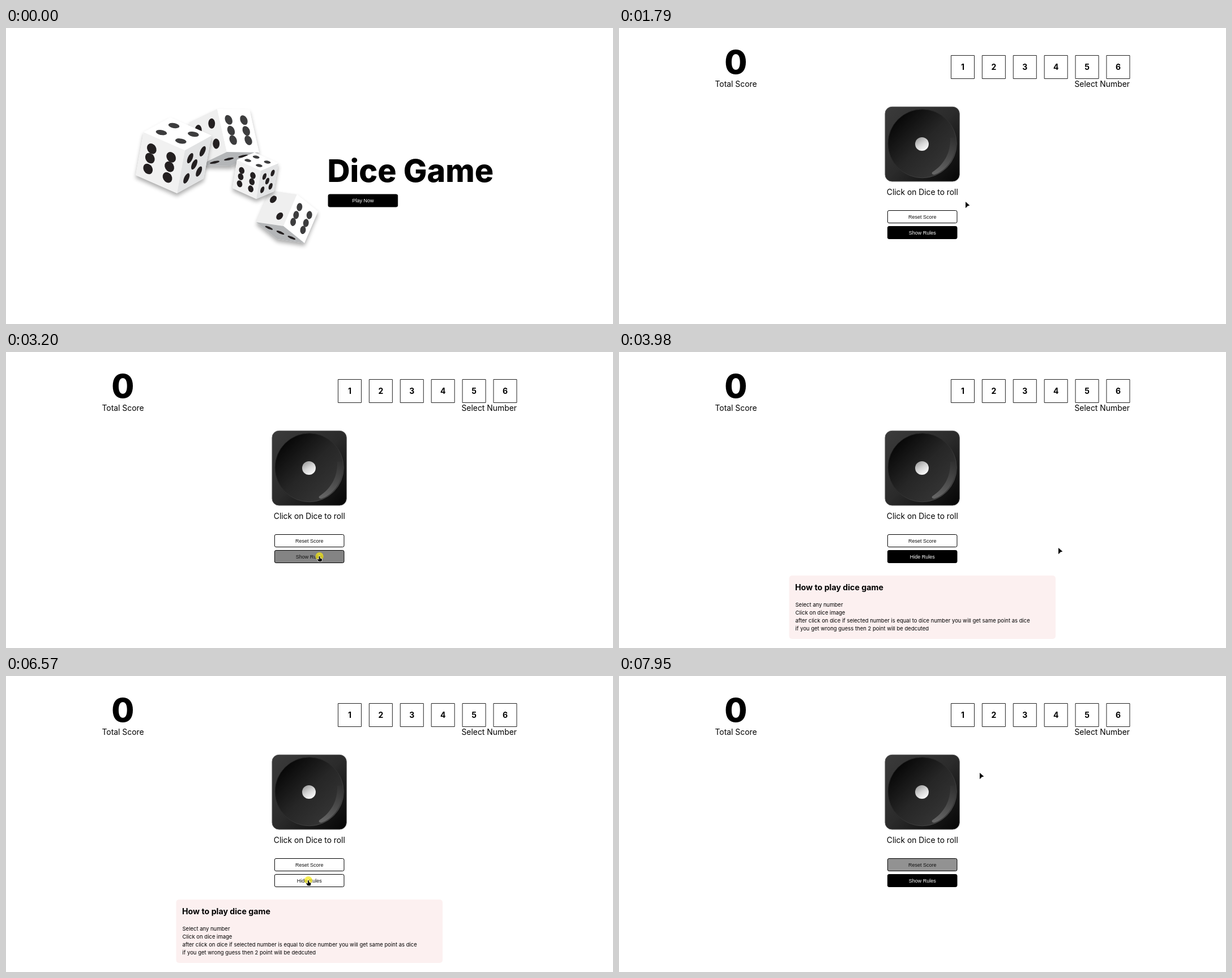
Write an HTML page with a canvas that moves like this. It is 1072 by 523 pixels and loops after 8 s.

```html
<!DOCTYPE html>
<html lang="en">
<head>
<meta charset="utf-8">
<title>Dice Game</title>
<style>
  html, body { margin: 0; width: 100%; height: 100%; overflow: hidden; background: #fff; }
  canvas { display: block; width: 1072px; height: 523px; }
</style>
</head>
<body>
<canvas id="stage"></canvas>
<script>
const W = 1072, H = 523, LOOP = 8000;
const canvas = document.getElementById('stage');
const ctx = canvas.getContext('2d');
const ratio = window.devicePixelRatio || 1;
canvas.width = W * ratio;
canvas.height = H * ratio;

const SANS = 'Inter, "Open Sans", sans-serif';
const ARIAL = '"Liberation Sans", Arial, sans-serif';
const INK = '#231f20', SOFT = '#3d3d3e', WHITE = '#fff';

const ENTRY = { x: 1033, y: 511 };
// The picture refreshes `updates` times per move while the pointer travels to x, y.
const MOVES = [
  { start: 190, end: 990, updates: 12, x: 612, y: 307 },
  { start: 1790, end: 2510, updates: 11, x: 673, y: 135, sway: 60 },
  { start: 2510, end: 2580, updates: 2, x: 668, y: 167 },
  { start: 2640, end: 3420, updates: 12, x: 553, y: 362 },
  { start: 3480, end: 3980, updates: 8, x: 776, y: 346 },
  { start: 4410, end: 5140, updates: 11, x: 597, y: 357 },
  { start: 5220, end: 5560, updates: 6, x: 534, y: 361 },
  { start: 6570, end: 6630, updates: 2, x: 534, y: 361 },
  { start: 6850, end: 7640, updates: 12, x: 586, y: 329 },
  { start: 7730, end: 7950, updates: 4, x: 637, y: 171 }
];

// Moments the pointer enters and leaves each button, alternating.
const HOVER = { play: [852], reset: [7060, 7812], rules: [3078, 3520, 5220, 6930] };
const GAME_AT = 990, RULES_OPEN = 3270, RULES_CLOSE = 6630;
const CLICK_LENGTH = 80;
const BTN_W = 123.6, BTN_H = 23;

const clamp = p => Math.min(1, Math.max(0, p));
const smooth = p => p * p * (3 - 2 * p);
const easeOut = p => 1 - (1 - p) ** 2;

// Time of the latest refresh, on a 10 ms clock.
function lastUpdate(t) {
  let last = 0;
  for (const { start, end, updates } of MOVES) {
    const step = (end - start) / (updates - 1);
    for (let k = 0; k < updates; k++) {
      const at = Math.floor((start + k * step) / 10) * 10;
      if (at <= t) last = at;
    }
  }
  return last;
}

// Each trip takes the first three quarters of its move, then rests.
function pointerAt(t) {
  let from = ENTRY, at = ENTRY;
  for (const to of MOVES) {
    if (to.start > t) break;
    const p = smooth(clamp((t - to.start) / (to.end - to.start) / 0.75));
    const dx = to.x - from.x, dy = to.y - from.y;
    const bow = (to.sway || 0) * Math.sin(2 * Math.PI * p) / (Math.hypot(dx, dy) || 1);
    at = { x: from.x + dx * p + dy * bow, y: from.y + dy * p - dx * bow };
    from = to;
  }
  return at;
}

function hoverState(events, t) {
  const past = events.filter(e => e <= t);
  if (!past.length) return { on: false, amount: 0 };
  const on = past.length % 2 === 1;
  const p = easeOut(clamp((t - past[past.length - 1]) / 400));
  return { on, amount: on ? p : 1 - p };
}

function text(str, x, y, size, weight = 400, align = 'left', color = '#000', family = SANS) {
  ctx.font = `${weight} ${size}px ${family}`;
  ctx.textAlign = align;
  ctx.fillStyle = color;
  ctx.fillText(str, x, y);
}

function box(x, y, w, h, r, fill, stroke) {
  ctx.beginPath();
  ctx.roundRect(x, y, w, h, r);
  if (fill) { ctx.fillStyle = fill; ctx.fill(); }
  if (stroke) { ctx.strokeStyle = stroke; ctx.lineWidth = 1; ctx.stroke(); }
}

function disc(x, y, r, fill) {
  ctx.beginPath();
  ctx.arc(x, y, r, 0, 2 * Math.PI);
  ctx.fillStyle = fill;
  ctx.fill();
}

function linear(x0, y0, x1, y1, ...colors) {
  const g = ctx.createLinearGradient(x0, y0, x1, y1);
  colors.forEach((c, i) => g.addColorStop(i / (colors.length - 1), c));
  return g;
}

function pipSpots(n) {
  const lo = 0.28, mid = 0.5, hi = 0.75, spots = [];
  if (n % 2) spots.push([mid, mid]);
  if (n === 2 || n > 3) spots.push([lo, lo], [hi, hi]);
  if (n > 2) spots.push([lo, hi], [hi, lo]);
  if (n === 6) spots.push([lo, mid], [hi, mid]);
  return spots;
}

// A unit square spanned by two die edges, with its pips.
function face([x, y], [ux, uy], [vx, vy], pips, fill) {
  ctx.save();
  ctx.transform(ux, uy, vx, vy, x, y);
  ctx.fillStyle = fill;
  ctx.fillRect(0, 0, 1, 1);
  for (const [u, v] of pipSpots(pips)) disc(u, v, 0.113, fill === WHITE ? SOFT : INK);
  ctx.restore();
}

// Three edges leave the nearest corner; each pair of neighbours spans a face.
function die(corner, edges, pips, fills) {
  const [x, y] = corner;
  const next = i => edges[(i + 1) % 3];
  ctx.save();
  ctx.shadowColor = 'rgba(0,0,0,.32)';
  ctx.shadowBlur = 7 * ratio;
  ctx.shadowOffsetY = 5 * ratio;
  ctx.beginPath();
  edges.forEach((e, i) => {
    ctx.lineTo(x + e[0], y + e[1]);
    ctx.lineTo(x + e[0] + next(i)[0], y + e[1] + next(i)[1]);
  });
  ctx.fillStyle = WHITE;
  ctx.fill();
  ctx.restore();
  edges.forEach((e, i) => face(corner, e, next(i), pips[i], fills[i]));
}

function diceGroup() {
  const upright = ['#f1f1f1', '#e2e3e4', WHITE];
  const tipped = ['#efefef', WHITE, '#b4b6b8'];
  die([390, 219], [[-50, 24], [-17, -76], [57, 1]], [4, 6, 3], tipped);
  die([316, 216], [[-73, -32], [-14, 76], [47, -26]], [6, 5, 4], upright);
  die([490, 350], [[-48, -7], [24, -56], [37, 30]], [2, 6, 3], tipped);
  die([450, 252], [[-42, -19], [-8, 50], [31, -13]], [6, 5, 4], upright);
}

// Six pips need their three rows along the shared upright edge.
const plainFace = face;
face = function (corner, u, v, pips, fill) {
  const upright = Math.abs(u[1]) > Math.abs(v[1]);
  plainFace(corner, upright ? v : u, upright ? u : v, pips, fill);
};

function rollingDie() {
  const cx = 535.7, cy = 204.3;
  box(470, 139.3, 131.3, 131.7, 12, linear(470, 139, 601, 271, '#3b3b3b', '#2b2b2b', '#050505'), '#555');
  disc(cx, cy, 60.5, linear(492, 162, 578, 247, '#080808', '#262626', '#353535'));
  ctx.strokeStyle = linear(492, 162, 578, 247, '#1a1a1a', '#2d2d2d', '#4a4a4a');
  ctx.lineWidth = 1;
  ctx.stroke();
  ctx.beginPath();
  ctx.arc(cx, cy, 59, -0.2, 1.2);
  ctx.quadraticCurveTo(551, 259, 553, 255);
  ctx.bezierCurveTo(573, 242, 586, 222, 585, 194);
  ctx.fillStyle = linear(565, 257, 592, 192, '#646464', '#484848', '#2f2f2f');
  ctx.fill();
  disc(535, 205, 12, linear(528, 195, 541, 215, '#a2a2a2', '#d6d6d6', '#f8f8f8'));
}

function button(label, x, y, hover, dark) {
  const level = Math.round(255 * (dark ? hover.amount : 1 - hover.amount));
  box(x + 0.5, y + 0.5, BTN_W - 1, BTN_H - 1, 2.5, `rgb(${level},${level},${level})`, '#000');
  const ink = dark === hover.on ? '#111' : '#fff';
  text(label, x + BTN_W / 2, y + 14.5, 9, 400, 'center', ink, ARIAL);
}

function landing(t) {
  diceGroup();
  text('Dice Game', 567.5, 272, 55.5, 800);
  button('Play Now', 568.6, 293.5, hoverState(HOVER.play, t), true);
}

function rulesPanel() {
  box(300.5, 395, 470.5, 112, 5, '#fcf0f0');
  text('How to play dice game', 311, 421, 14.2, 700);
  [
    'Select any number',
    'Click on dice image',
    'after click on dice if selected number is equal to dice number you will get same point as dice',
    'if you get wrong guess then 2 point will be dedcuted'
  ].forEach((line, i) => text(line, 311.5, 450 + i * 14, 9.5));
}

function game(t) {
  const open = t >= RULES_OPEN && t < RULES_CLOSE;
  text('0', 206.3, 81, 58, 800, 'center');
  text('Total Score', 206.5, 104.3, 13.9, 400, 'center');
  for (let i = 0; i < 6; i++) {
    box(586.5 + i * 54.9, 48.5, 41, 41, 0, null, '#222');
    text(i + 1, 607 + i * 54.9, 74.2, 14, 700, 'center');
  }
  text('Select Number', 902, 104.3, 13.9, 400, 'right');
  rollingDie();
  text('Click on Dice to roll', 535.8, 295, 13.8, 400, 'center');
  button('Reset Score', 473.9, 322, hoverState(HOVER.reset, t), false);
  button(open ? 'Hide Rules' : 'Show Rules', 473.9, 350, hoverState(HOVER.rules, t), true);
  if (open) rulesPanel();
}

const ARROW = new Path2D('M0 0 L7.4 6.6 L3.8 7.4 L0 11.2 Z');
const HAND = new Path2D('M-1 0.4 Q0 -0.6 1 0.4 V3.6 L3.6 4.2 Q4.8 4.6 4.5 6 L3.6 9.4 H-1.4 L-3.8 5.6 Q-3.6 4.4 -2.4 5 L-1 6 Z');

function pointer(t, hand) {
  if (t < MOVES[0].start) return;
  const { x, y } = pointerAt(t);
  const clicking = [GAME_AT, RULES_OPEN, RULES_CLOSE].some(end => t < end && t >= end - CLICK_LENGTH);
  if (clicking) disc(x, y, 7, 'rgba(244,232,20,.74)');
  const shape = hand ? HAND : ARROW;
  ctx.save();
  ctx.translate(x, y);
  ctx.lineJoin = 'round';
  ctx.strokeStyle = 'rgba(255,255,255,.85)';
  ctx.lineWidth = 1.4;
  ctx.stroke(shape);
  ctx.fillStyle = '#0a0a0a';
  ctx.fill(shape);
  ctx.restore();
}

function draw(now) {
  const t = lastUpdate(now % LOOP);
  const onLanding = t < GAME_AT;
  const targets = onLanding ? [HOVER.play] : [HOVER.reset, HOVER.rules];
  ctx.setTransform(ratio, 0, 0, ratio, 0, 0);
  ctx.fillStyle = WHITE;
  ctx.fillRect(0, 0, W, H);
  (onLanding ? landing : game)(t);
  pointer(t, targets.some(events => hoverState(events, t).on));
}

let start = null;
function tick(now) {
  if (start === null) start = now;
  draw(now - start);
  requestAnimationFrame(tick);
}
draw(0);
requestAnimationFrame(tick);
</script>
</body>
</html>
```
